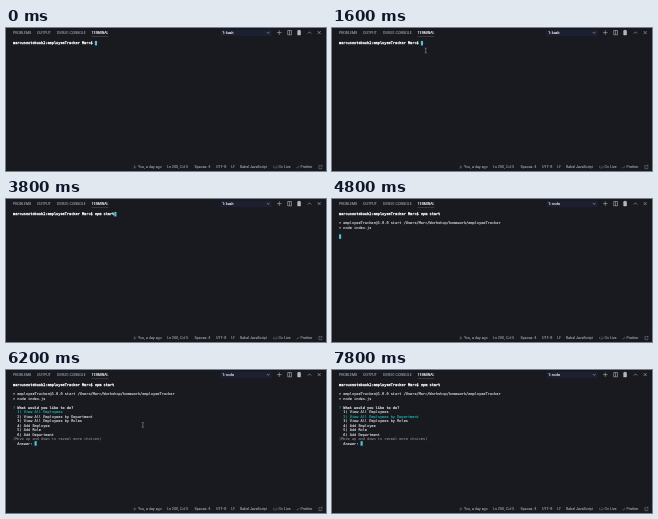
Animation of 320 by 143 pixels, one loop 8 s. Source, as an HTML page:

```html
<!DOCTYPE html>
<html lang="en">
<head>
<meta charset="utf-8">
<title>Terminal session</title>
<style>
  html, body { margin: 0; width: 100%; height: 100%; overflow: hidden; background: #181a20; }
  svg { display: block; width: 100vw; height: 100vh; }
  text { white-space: pre; }
  .ui { font: 33.5px Inter, Roboto, sans-serif; fill: #a0a2aa; stroke: #a0a2aa; stroke-width: 1; }
  .status { font-size: 34px; }
  .mono { font: 35.8px "DejaVu Sans Mono", monospace; fill: #e8e9ec; stroke: #e8e9ec; stroke-width: .9; }
  .bold { font-weight: bold; }
  .mono.prompt { fill: #fff; stroke: #fff; stroke-width: 2.6; }
  .mono.picked { fill: #20bcbc; stroke: #20bcbc; }
  .mono.hint { fill: #85878e; stroke: #85878e; }
  .mono.mark { fill: #23b57a; stroke: none; }
  .ui.lit { fill: #f2f2f4; stroke: #f2f2f4; stroke-width: 1.4; }
  .icon { fill: none; stroke: #c8cad0; stroke-width: .5; }
  .icon.solid { fill: #b4b6bc; }
  .icon.dim { stroke: #a0a2aa; stroke-width: .4; }
</style>
</head>
<body>
<svg id="stage" viewBox="0 0 320 143">
  <rect width="320" height="143" fill="#181a20"/>
</svg>
<script>
const LOOP = 8000, STEP = 200;
const COL = 2.155, ROW = 4.48, LEFT = 7, TOP = 15.2;
const stage = document.getElementById('stage');

function add(tag, attrs, parent = stage) {
  const node = document.createElementNS('http://www.w3.org/2000/svg', tag);
  for (const key in attrs) node.setAttribute(key, attrs[key]);
  return parent.appendChild(node);
}

// Glyphs are set large and scaled down so tiny sizes stay accurate.
function label(x, y, str, cls, parent) {
  const node = add('text', { class: cls, transform: `translate(${x} ${y}) scale(.1)` }, parent);
  node.textContent = str;
  return node;
}

const line = (row, col, str, cls = '', parent) =>
  label(LEFT + col * COL, TOP + row * ROW + 1.2, str, 'mono ' + cls, parent);

const icon = (d, cls = '') => add('path', { class: 'icon ' + cls, d });
const show = (node, on) => node.setAttribute('visibility', on ? 'visible' : 'hidden');

// Panel header
[[7, 'PROBLEMS'], [31, 'OUTPUT'], [51, 'DEBUG CONSOLE']].forEach(([x, s]) => label(x, 5.8, s, 'ui'));
label(85.5, 5.8, 'TERMINAL', 'ui lit');
add('rect', { x: 85.5, y: 8.5, width: 16.8, height: .35, fill: '#6c6f78' });
add('rect', { x: 214.5, y: 1.6, width: 51.2, height: 6.4, fill: '#1c2030' });
const shell = label(216.6, 5.8, '1: bash', 'ui lit');
icon('M260.8 4l1.4 1.4L263.6 4');
icon('M271 4.6h4.6M273.3 2.3v4.6');
icon('M281.7 2.5h3.8v4.3h-3.8zM283.6 2.5v4.3');
icon('M291.2 3h3.8M292.3 3v-.7h1.6V3M291.7 3.2v3.7h2.8V3.2z', 'solid');
icon('M301.8 5.5l1.7-1.7 1.7 1.7');
icon('M311.7 3.1l3 3M314.7 3.1l-3 3');

// Status bar
[[132, 'You, a day ago'], [161, 'Ln 200, Col 5'], [188.5, 'Spaces: 4'], [210, 'UTF-8'], [225.3, 'LF'],
 [234, 'Babel JavaScript'], [272.5, 'Go Live'], [294.6, 'Prettier']]
  .forEach(([x, s]) => label(x, 140.2, s, 'ui status'));
icon('M128.3 137.4v3.2M128.3 139.6q1.6 0 1.6-1.5', 'dim');
icon('M268 137.7a1.8 1.8 0 0 0 0 2.5M270.6 137.7a1.8 1.8 0 0 1 0 2.5M269.3 138.7v1.9', 'dim');
icon('M290.6 139.2l.9 1 1.6-2.2', 'dim');
icon('M314.4 137.5h-1.5v3.2h3v-1.4M314.4 138.9l1.7-1.6M315 137.3h1.1v1.1', 'dim');

// Terminal
const cursor = add('rect', { width: COL, height: 4.5, fill: '#50c2d8' });
line(0, 0, 'marcusnotebook2:employeeTracker Marc$', 'prompt');
const command = line(0, 38, 'npm start', 'prompt');

const output = add('g', {});
line(2, 0, '> employeeTracker@1.0.0 start /Users/Marc/Workshop/homework/employeeTracker', '', output);
line(3, 0, '> node index.js', '', output);

const menu = add('g', {});
line(5, 0, '?', 'bold mark', menu);
line(5, 2, 'What would you like to do?', 'bold', menu);
const choices = ['View All Employees', 'View All Employees by Department', 'View All Employees by Roles',
  'Add Employee', 'Add Role', 'Add Department']
  .map((s, i) => line(6 + i, 2, `${i + 1}) ${s}`, '', menu));
line(12, 0, '(Move up and down to reveal more choices)', 'hint', menu);
line(13, 2, 'Answer:', '', menu);

const pointer = add('path', {
  d: 'M-1-2.5Q0-2.5 0-1.7Q0-2.5 1-2.5M0-1.7V1.7M-1 2.5Q0 2.5 0 1.7Q0 2.5 1 2.5',
  fill: 'none', stroke: '#a4a6ac', 'stroke-width': .5
});

// Pointer stops: time, x, y; no position means hidden.
const stops = [
  [0], [400, 141, 51], [600, 112, 42], [800, 70, 28], [1000, 42, 13], [1200, 72, 19],
  [1400, 95.5, 27], [1600, 93.7, 22.5], [2000, 108, 33], [2200, 130, 49], [2400, 139.4, 57],
  [3200], [5600, 136.8, 55], [6800, 128, 55], [7000, 108, 55], [7200, 98.3, 55], [7800]
];

const cursorAt = t =>
  t < 3200 ? [0, 38] : t < 4400 ? [0, 47] : t < 4600 ? [1, 0] : t < 5200 ? [5, 0] : [13, 10];

function draw(time) {
  const t = Math.floor(time / STEP) * STEP;
  const [row, col] = cursorAt(t);
  cursor.setAttribute('x', LEFT + col * COL);
  cursor.setAttribute('y', TOP + row * ROW - 2.25);

  show(command, t >= 3200);
  show(output, t >= 4600);
  show(menu, t >= 5200);
  shell.textContent = t < 4800 ? '1: bash' : '1: node';

  const picked = t < 7800 ? 0 : 1;
  choices.forEach((c, i) => c.setAttribute('class', i === picked ? 'mono picked' : 'mono'));

  const [, x, y] = stops.filter(s => s[0] <= t).pop();
  show(pointer, x !== undefined);
  if (x !== undefined) pointer.setAttribute('transform', `translate(${x} ${y})`);
}

const start = performance.now();
function tick() {
  draw((performance.now() - start) % LOOP);
  requestAnimationFrame(tick);
}
tick();
</script>
</body>
</html>
```
